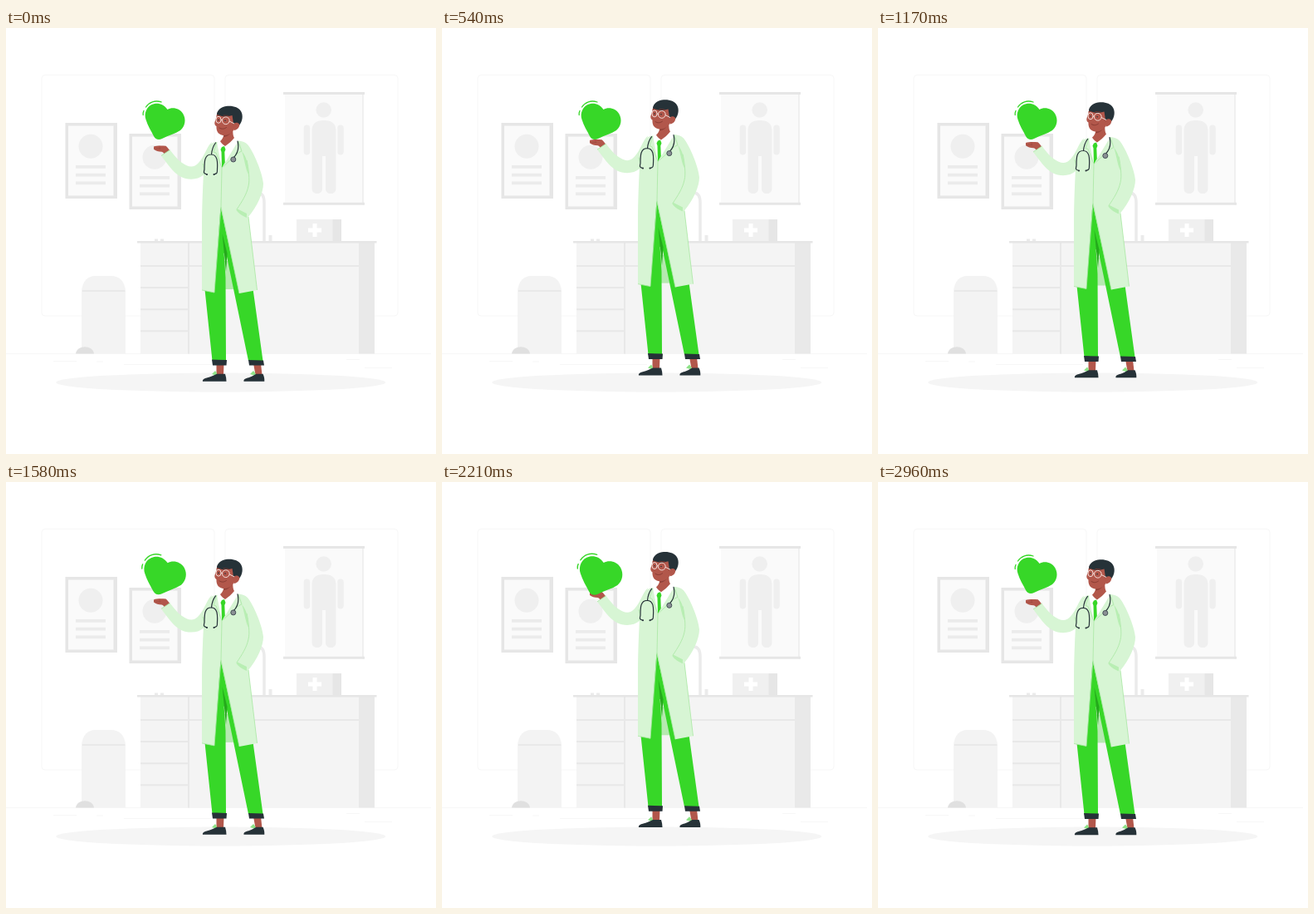
Write an HTML page that moves like this. It is 518 by 512 pixels and loops after 3 s.

```html
<!DOCTYPE html>
<html lang="en">
<head>
<meta charset="utf-8">
<title>Doctor with a heart</title>
<style>
html, body { margin: 0; width: 100%; height: 100%; overflow: hidden; background: #fff; }
svg { display: block; width: 518px; height: 512px; }
.coat { fill: #d7f5d4; }
.fold { fill: none; stroke: #a9e8a3; stroke-width: .8; }
.green { fill: #37d728; }
.skin { fill: #b2574b; }
.dark { fill: #263238; }
.line { fill: none; stroke: #263238; stroke-width: 1.2; stroke-linecap: round; }
</style>
</head>
<body>
<svg viewBox="0 0 518 512">
  <defs>
    <g id="diploma">
      <path fill="#e6e6e6" d="M71.500 114h62.500v91H71.500z"/>
      <path fill="#fafafa" d="M75 117.500h54.500v84H75z"/>
      <circle cx="102" cy="142.300" r="14.500" fill="#efefef"/>
      <path stroke="#ebebeb" stroke-width="3.700" d="M84 166.800h36M84 176.700h36M84 186.300h36"/>
    </g>
  </defs>

  <!-- Room -->
  <g fill="none" stroke="#f7f7f7">
    <rect x="43" y="56.500" width="208" height="289.500" rx="4"/>
    <rect x="264" y="56.500" width="208" height="289.500" rx="4"/>
    <path d="M0 391.500h512M57 400.500h28M109 401h8M142 404.500h105M410 398.500h16M432 408.500h33"/>
  </g>
  <ellipse cx="258.700" cy="426" rx="198.500" ry="11.500" fill="#f5f5f5"/>
  <use href="#diploma"/>
  <use href="#diploma" x="77" y="13"/>

  <path fill="#fafafa" d="M336 79h93v132h-93z"/>
  <path fill="#f0f0f0" d="M429 79h2v132h-2z"/>
  <path stroke="#e6e6e6" stroke-width="3" d="M334 78.500h98M334 211.200h98"/>
  <g fill="#efefef">
    <circle cx="382.700" cy="98.500" r="9.300"/>
    <rect x="358.700" y="116.500" width="7.500" height="36" rx="3.700"/>
    <rect x="399.300" y="116.500" width="7.500" height="36" rx="3.700"/>
    <path d="M368.500 122C369 114 375 111 383 111s14 3 14.500 11v71c0 8-12.500 8-12.500 0v-39h-4v39c0 8-12.500 8-12.500 0z"/>
  </g>

  <path fill="none" stroke="#ebebeb" stroke-width="3.500" d="M311 256v-46c0-7-2-12-8-12"/>
  <path fill="#ebebeb" d="M316.500 249h4v8h-4zM179 253.500h4v3h-4zM186 253.500h4v3h-4z"/>
  <path fill="#f4f4f4" d="M162 258h263v133.500H162z"/>
  <path fill="#e9e9e9" d="M425 258h19v133.500h-19z"/>
  <path stroke="#e8e8e8" stroke-width="2" d="M162 286h263M162 312h58M162 338.200h58M162 364.300h58M220 258v133.500"/>
  <path fill="#e6e6e6" d="M158 256h288.500v2.500H158z"/>
  <path fill="#f0f0f0" d="M350 230h44v26h-44z"/>
  <path fill="#e6e6e6" d="M393.500 230H404v26h-10.500z"/>
  <path stroke="#fff" stroke-width="5" d="M364 243h16M372 235v16"/>

  <path fill="#f3f3f3" d="M91 391.500V316C92 304 99 298 107 298h20c9 0 16 6 17 18v75.500z"/>
  <path stroke="#e6e6e6" stroke-width="1.500" d="M92 316h51.500"/>
  <path fill="#e0e0e0" d="M84 391.500c1-11 21-11 22 0z"/>

  <g id="doctor">
    <!-- Legs and shoes -->
    <path fill="#b5e9b0" d="M258 280h25v34h-25z"/>
    <path class="skin" d="M253.500 403h9l-.500 14h-8.500zM298 403h9l1.500 14h-8z"/>
    <path class="green" d="M238 300l10.500 100h16.500l-.500-100L259 214zM259 214l-5 60 11-4 27 130h17.500L297 310z"/>
    <path fill="#25a91c" d="M260.500 247l6 24-1.500 22z"/>
    <path class="dark" d="M248 398.500l18 .500-.500 6.500h-16.500zM292 399l18 .500 1 6h-18z"/>
    <path fill="#8ee287" d="M248 416l4-4 2 3v3zM294 416l4-4 2.500 3v3z"/>
    <path id="shoe" class="dark" d="M237 424.800c-1-3 4-4 7.500-5 4-1 6.500-3 9.500-4h10c1 3 1.500 6 1.500 9z"/>
    <path class="dark" d="M286.500 424.800c-1-3 4-4 7-5 4-1 5-3 8-4h8c1.500 3 2 6 1.800 9z"/>

    <!-- Raised hand and sleeve -->
    <path class="skin" d="M178 142.500c4-1.500 10-1 14.500-.800 2 1.500 3.500 3.500 5 6l-6 5c-1-2-2-3.500-4-4-4 0-7-1-9.500-3z"/>
    <path class="line" style="stroke:#97443b;stroke-width:.5" d="M180 145h6M185 142v3"/>
    <path class="coat" d="M248 137c-6 5-9 18-16 25-6 7-13 5-20 0-6-4-10-10-14.500-15.500L187 153.500c7 9 14 20 23 25 10 5 21 4 28-2z"/>
    <path class="fold" d="M187 153.500l10.500-7M238 176c1-6 0-10-1-13"/>

    <!-- Shirt and tie -->
    <path fill="#fff" d="M255 136l4-3 9 6 8-5 4 4-10 26-9 15-6-20z"/>
    <path class="green" d="M260 143l3-1 1.500 4-1.200 3 .5 13-3.800 7-.5-20-1-3z"/>

    <!-- Neck and head -->
    <path class="skin" d="M262 120l12-4c-1 7-1 13 1 16-3 4-7 7-11 10-3-2-5-4-6-6 4-3 5-8 4-16z"/>
    <path fill="#8f4038" d="M262.500 128c4-.5 7-2.500 10-6-1 5-5 8-10 9z"/>
    <path class="skin" d="M255 101c6-5 18-4 22 4v10c-1 8-7 14-14 14-7 0-10-5-9.500-11-2-1-2.500-3-2-5 1.500-4 2-8 3.500-12z"/>
    <path class="dark" d="M254 104c0-5 5-9 11-10 8-1 15 1 18 6 3 5 2 12-2 17l-7 1c0-4-.5-7-1.500-13-6 2-12 2-18.500-1z"/>
    <path class="skin" d="M273.500 116c2-3 6-3 7.500-.500 1 3-2 7-6.500 7.500z"/>
    <path class="line" style="stroke:#7e352e;stroke-width:.8" d="M257 120c3 2 6 1.500 8.500-.5M262 105l6 .5M254 105l3 .3"/>
    <g fill="none" stroke="#f4ded9" stroke-width="1">
      <circle cx="264.800" cy="111.300" r="4.400"/>
      <ellipse cx="256" cy="110.300" rx="3" ry="4"/>
      <path d="M259 110.500l1.500.3M269 112l6 3"/>
    </g>
    <circle class="dark" cx="264" cy="111.200" r=".8"/>
    <circle class="dark" cx="256" cy="110.500" r=".8"/>

    <!-- Coat -->
    <path class="coat" d="M254 137c-8 0-13 8-15 20-2 32-3 60-3 80v78l15 3 7.500-103 22.500 104 21.500-4-10.500-88c11-13 18-29 18-40-1-13-12-39-19-47-3-3-7-4-11-4.500L260 168z"/>
    <path class="fold" d="M260 168l-1 47-8 103M259 215l22 104M292 227l10.500 88M236 315l15 3M290 159c2 9 4 24 2 31-2 10-8 19-14 28"/>
    <path fill="#b8eeb3" d="M284 148c6 7 8 16 8 28-4-8-4-16-8-28zM278 217l12 6v5c-5-2-10-5-12.500-9z"/>
    <path class="fold" d="M254 137l-4 12 3 1 7 18M280 136l4 12-4 2-20 18"/>

    <!-- Stethoscope -->
    <path class="line" d="M252.500 138c-3 4-4.500 8-5 14M242 176c-4-1-4-2-3-6 0-9 0-18 8-18s8 9 7.500 18c0 4 0 5-4 6M279 136c2 8 0 15-5 20"/>
    <circle cx="273.800" cy="158" r="3" fill="#8b9195" stroke="#455057"/>
    <circle class="dark" cx="242" cy="176" r="1"/>
    <circle class="dark" cx="250.500" cy="176" r="1"/>
  </g>

  <g id="heart">
    <path class="green" d="M194.500 98c-4-6-10-8-15.500-7-10 2-13 12-10.500 19 2 7 6.500 14 9.500 20 2 4 6 5 10 3 8-4 16-6 22-10 6-5 7-13 3.500-19.500-4-7-13-9-19-5.500z"/>
    <path fill="none" stroke="#37d728" stroke-width="1.300" stroke-linecap="round" d="M168.500 95c4-6 11-8.500 18.500-6M166 99.500c-.8 1.500-1 3-.8 5"/>
  </g>
</svg>
<script>
const doctor = document.getElementById('doctor');
const heart = document.getElementById('heart');
const BEAT = 1500, RISE = 10.24;

// Triangular pulse: 0 at start, 1 at peak, 0 at end
const pulse = (p, start, peak, end) =>
  Math.max(0, Math.min((p - start) / (peak - start), (end - p) / (end - peak)));

function draw(now) {
  const p = now % BEAT / BEAT;
  const scale = 1 + .1 * (pulse(p, 0, .1, .3) + pulse(p, .4, .5, .6));
  doctor.setAttribute('transform', `translate(0 ${-RISE * pulse(p, 0, .5, 1)})`);
  heart.setAttribute('transform', `translate(191 111) scale(${scale}) translate(-191 -111)`);
}

const start = performance.now();
function tick() {
  draw(performance.now() - start);
  requestAnimationFrame(tick);
}
tick();
</script>
</body>
</html>
```
